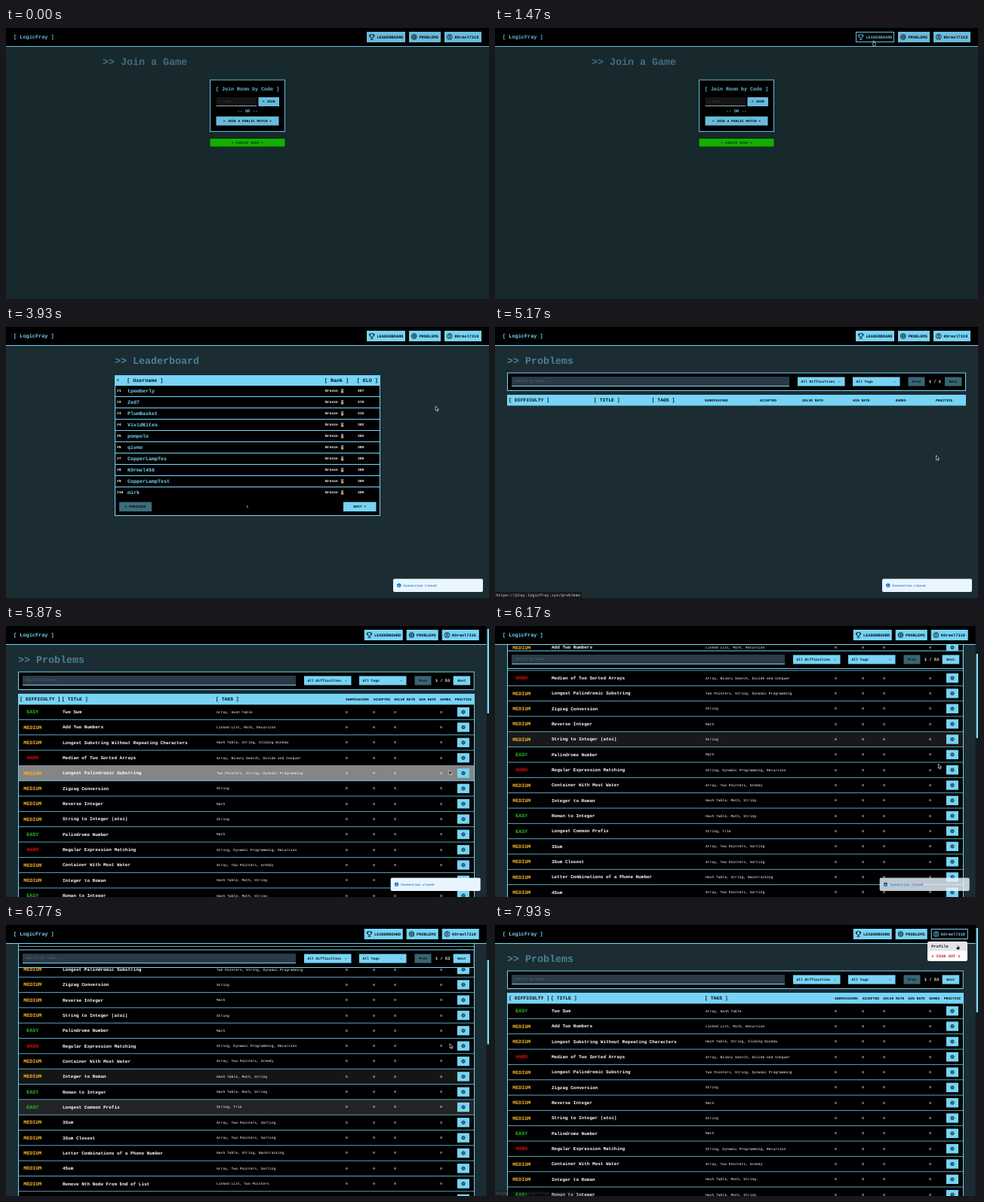
Recreate the animation shown at these times as an HTML page. Size 640 by 360 pixels, loop 8000 ms.

```html
<!DOCTYPE html>
<html lang="en">
<head>
<meta charset="utf-8">
<title>Coding match site walkthrough</title>
<style>
html, body { margin: 0; width: 100%; height: 100%; overflow: hidden; background: #1b2c33; }
svg {
  display: block; width: 640px; height: 360px;
  --c: #77d4f6; --bg: #1b2c33; --title: #4a7f96;
  font-family: "Liberation Mono", "Courier New", monospace;
  text-rendering: geometricPrecision;
}
svg.dim { --c: #69bbdb; --bg: #18292d; --title: #436d82; }
text { white-space: pre; }
.ink { fill: #050d10; }
.line { fill: none; stroke: #050d10; stroke-width: .8; }
.hover .face { fill: #000; }
.hover .ink { fill: var(--c); }
.hover .line { stroke: var(--c); }
</style>
</head>
<body>
<svg id="stage" viewBox="0 0 640 360"></svg>
<script>
const LOOP = 8000, C = 'var(--c)', INK = '#050d10', PITCH = 20.33;
const stage = document.getElementById('stage');

// Drawing helpers: boxes by corners, text by vertical centre
const box = (x, y, x2, y2, fill, more = '') =>
  `<rect x="${x}" y="${y}" width="${x2 - x}" height="${y2 - y}" fill="${fill}" ${more}/>`;
const frame = (x, y, x2, y2) =>
  box(x + .5, y + .5, x2 - .5, y2 - .5, '#000', `stroke="${C}"`);
const safe = s => s.replace(/&/g, '&amp;').replace(/</g, '&lt;');
const text = (x, y, size, s, fill = '#fff', weight = 700, more = '') =>
  `<text x="${x}" y="${(y + size * .32).toFixed(2)}" font-size="${size}" font-weight="${weight}" fill="${fill}" ${more}>${safe(s)}</text>`;
const mid = (x, y, size, s, fill, weight) => text(x, y, size, s, fill, weight, 'text-anchor="middle"');
const button = (x, y, x2, y2, s, fill = C, ink = INK) =>
  box(x, y, x2, y2, fill) + mid((x + x2) / 2, (y + y2) / 2, 4.67, s, ink);
const group = (id, body) => `<g id="${id}">${body}</g>`;
const heading = (x, s) => text(x, 44.5, 13.33, '>> ' + s, 'var(--title)');

function navButton(id, x, x2, label, icon) {
  return group(id,
    `<rect class="face" x="${x + .5}" y="5.5" width="${x2 - x - 1}" height="13" fill="${C}" stroke="${C}"/>` +
    `<g class="line" transform="translate(${x + 6.8} 12)">${icon}</g>` +
    `<text class="ink" x="${x + 13.4}" y="13.8" font-size="5.33" font-weight="700">${label}</text>`);
}

const trophy = '<path d="M-2-3.3H2V-.5A2 2 0 0 1-2-.5ZM-2-2.5H-3.4Q-3.4 0-1.7 .3M2-2.5H3.4Q3.4 0 1.7 .3M0 1.5V3.2M-2 3.3H2"/>';
const target = '<circle r="3.4"/><circle r="2"/><circle r=".6"/>';
const person = '<circle r="3.4"/><circle cy="-.9" r="1.2"/><path d="M-2.2 2.5Q0-.2 2.2 2.5"/>';

const header =
  box(0, 0, 640, 24, '#000') + box(0, 24, 640, 25, C) +
  text(10, 12, 6.9, '[ LogicFray ]', C) +
  group('nav',
    navButton('navBoard', 478, 529, 'LEADERBOARD', trophy) +
    navButton('navProblems', 534, 576, 'PROBLEMS', target) +
    navButton('navUser', 581, 630, 'KOrmel7318', person));

const join =
  heading(128, 'Join a Game') +
  frame(270, 68.5, 370, 138) +
  mid(320, 80.5, 6.67, '[ Join Room by Code ]', C) +
  box(278.5, 92, 332, 104, '#151515') + box(278.5, 103, 332, 104, '#8fa9b3') +
  text(282, 97.7, 4.67, '> Code', '#3a3a3a', 400) +
  button(334.5, 92, 362, 104, '< JOIN') +
  mid(320, 110.5, 5.6, '-- OR --', C) +
  button(278.5, 117.5, 361.5, 129.5, '> JOIN A PUBLIC MATCH <') +
  box(270, 146, 370, 158, '#062c04') +
  button(270.5, 147, 369.5, 157.5, '+ CREATE ROOM +', '#12b000', '#07480a');

const players = [
  ['tpemberly', 407], ['Zed7', 378], ['PlumBasket', 315], ['VividKites', 302], ['pompolo', 302],
  ['qivmo', 300], ['CopperLampTes', 300], ['KOrmel456', 300], ['CopperLampTest', 300], ['mirk', 300]
];
const playerRow = ([name, elo], i) => {
  const y = 85 + 15 * i;
  return (i ? box(144, y - 8, 496, y - 7, C) : '') +
    text(147, y, 4.67, '#' + (i + 1)) + text(161, y - .3, 6.67, name, C) +
    text(423, y, 4.67, 'Bronze') +
    `<path d="M443.6 ${y - 3}h4l-1 3h-2z" fill="#3f86b8"/><circle cx="445.6" cy="${y + 1}" r="1.9" fill="#d98945"/>` +
    text(466, y, 4.67, String(elo));
};
const boardFoot =
  button(150, 232.5, 193, 245, '< PREVIOUS', '#3d6c7d') +
  mid(320, 238.5, 4.67, '1', C) + button(447, 232.5, 490.5, 245, 'NEXT >');
const boardTop = box(144, 64, 496, 78, C) + text(147, 71, 4.67, '#', INK) +
  [[160.3, '[ Username ]'], [422, '[ Rank ]'], [464.8, '[ ELO ]']]
    .map(([x, s]) => text(x, 70.7, 6.67, s, INK)).join('');
const board = heading(144, 'Leaderboard') +
  group('boardEmpty', frame(144, 64, 496, 101) + `<g transform="translate(0 -150)">${boardFoot}</g>`) +
  group('boardFull', frame(144, 64, 496, 251) + players.map(playerRow).join('') + boardFoot) +
  boardTop;

// Filter bar: dx moves the selects, dr the right edge
function filterBar(dx, dr, pages, nextFill) {
  const select = (x, s) => box(x, 66.5, x + 62.5, 78.5, C) + text(x + 4.4, 72.5, 4.67, s, INK) +
    `<path d="M${x + 54} 71.8l1.5 1.5 1.5-1.5" fill="none" stroke="#2f6d85" stroke-width=".7"/>`;
  return frame(16, 60.5, 624 + dr, 85) +
    box(22, 66, 390 + dx, 79, '#2a3a47') + box(22, 78, 390 + dx, 79, C) +
    text(26, 72, 4.67, 'Search by name...', '#53697a', 400) +
    select(401 + dx, 'All Difficulties') + select(474 + dx, 'All Tags') +
    button(547.5 + dx, 66.5, 569.5 + dx, 78.5, 'Prev', '#3a6475') +
    text(575 + dx, 72.5, 5.33, pages) +
    button(596 + dr, 66.5, 618.5 + dr, 78.5, 'Next', nextFill);
}
const columns = (right, big, small) => box(16, 90, right, 104.5, C) +
  ['[ DIFFICULTY ]', '[ TITLE ]', '[ TAGS ]'].map((s, i) => text(big[i], 97.2, 6.4, s, INK)).join('') +
  ['SUBMISSIONS', 'ACCEPTED', 'SOLVE RATE', 'WIN RATE', 'GAMES', 'PRACTICE']
    .map((s, i) => text(small[i], 97.2, 4.67, s, INK)).join('');

const problems = `E|Two Sum|Array, Hash Table
M|Add Two Numbers|Linked List, Math, Recursion
M|Longest Substring Without Repeating Characters|Hash Table, String, Sliding Window
H|Median of Two Sorted Arrays|Array, Binary Search, Divide and Conquer
M|Longest Palindromic Substring|Two Pointers, String, Dynamic Programming
M|Zigzag Conversion|String
M|Reverse Integer|Math
M|String to Integer (atoi)|String
E|Palindrome Number|Math
H|Regular Expression Matching|String, Dynamic Programming, Recursion
M|Container With Most Water|Array, Two Pointers, Greedy
M|Integer to Roman|Hash Table, Math, String
E|Roman to Integer|Hash Table, Math, String
E|Longest Common Prefix|String, Trie
M|3Sum|Array, Two Pointers, Sorting
M|3Sum Closest|Array, Two Pointers, Sorting
M|Letter Combinations of a Phone Number|Hash Table, String, Backtracking
M|4Sum|Array, Two Pointers, Sorting
M|Remove Nth Node From End of List|Linked List, Two Pointers
E|Valid Parentheses|String, Stack
E|Merge Two Sorted Lists|Linked List, Recursion
M|Generate Parentheses|String, Dynamic Programming, Backtracking
H|Merge k Sorted Lists|Linked List, Divide and Conquer
M|Swap Nodes in Pairs|Linked List, Recursion
H|Reverse Nodes in k-Group|Linked List, Recursion`.split('\n').map(l => l.split('|'));
const levels = { E: ['EASY', '#1fc41f'], M: ['MEDIUM', '#f8b62c'], H: ['HARD', '#dc0c0c'] };

function problemRow([level, name, tags], i) {
  const top = 104.1 + PITCH * i, y = top + 10.1, [label, color] = levels[level];
  return box(16, top, 621, top + PITCH, '#858585', `class="shade" opacity="0"`) +
    mid(35.2, y, 6.67, label, color) + text(75, y, 6, name) + text(279, y, 4.67, tags, '#fff', 400) +
    [451.3, 487.7, 515.6, 576.7].map(x => mid(x, y, 4.67, '0', '#fff', 400)).join('') +
    box(598, y - 6.2, 614, y + 6.2, C) +
    `<circle cx="606" cy="${y}" r="2.2" fill="#3a7488" stroke="#1d4452"/>` +
    box(16, top + PITCH - .5, 621, top + PITCH + .4, C, 'opacity=".85"');
}
const tableEnd = 104 + PITCH * problems.length;
const loaded =
  group('scroller', heading(16, 'Problems') +
    box(16, 104, 621, tableEnd, '#000') + problems.map(problemRow).join('') +
    box(16, 90, 17, tableEnd, C) + box(620, 90, 621, tableEnd, C) +
    columns(621, [18.3, 74, 278], [450, 486.7, 514.3, 547.5, 575.3, 594.8])) +
  group('sticky', filterBar(-6, -3.3, '1 / 53', C));
const loading = heading(16, 'Problems') + filterBar(0, 0, '1 / 1', '#3a6475') +
  columns(624, [18.3, 131, 207.7], [277.8, 350.8, 407, 474.3, 530.7, 584]);

const toast = box(513, 334.5, 632, 352, '#e9f5fe', 'rx="2"') +
  '<circle cx="520.8" cy="343.3" r="2.7" fill="#1c74d4"/>' + mid(520.8, 343.3, 4, 'i') +
  text(526.5, 343.3, 4.33, 'Connection closed', '#2f88d8');
const menu = box(573, 22, 626, 48, '#fff', 'rx="2.5"') + box(573, 23.5, 626, 34.5, '#e3e4ea') +
  text(578.3, 28, 5.33, 'Profile', '#15181c') + text(578.3, 41.3, 5.33, 'x SIGN OUT x', '#d0202a');
const url = '<rect id="urlBox" y="352" height="8" fill="#15191b"/>' +
  text(1.3, 356, 5.33, '', '#dcdcdc', 400, 'id="urlText"');
const arrow = '<path d="M0 0V6.2L1.5 4.9 2.4 7 3.4 6.6 2.5 4.6H4.4Z" fill="#111" stroke="#fff" stroke-width=".6"/>';
const hand = '<path d="M-.5 0H.5V2.4L2.8 3V5L2 6.8H-.8L-2 4.4-1.5 3.6-.5 4.2Z" fill="#111" stroke="#fff" stroke-width=".5"/>';

stage.innerHTML = box(0, 0, 640, 360, 'var(--bg)') +
  group('join', join) + group('board', board) + group('loading', loading) + group('loaded', loaded) + header +
  group('bar', box(636.7, 0, 640, 360, '#12191d') + `<rect id="thumb" x="637.6" width="2.4" height="112" fill="${C}"/>`) +
  group('toast', toast) + group('url', url) + group('menu', menu) +
  group('cursor', group('arrow', arrow) + group('hand', hand));

const el = {};
stage.querySelectorAll('[id]').forEach(n => el[n.id] = n);
const shades = [...stage.querySelectorAll('.shade')];

// Motion tables: time, then values
const path = [
  [200, 281, 142], [370, 281, 142], [530, 375, 175], [700, 375, 175], [800, 464, 190], [1230, 464, 190],
  [1500, 503, 11], [1980, 503, 11], [2400, 515.5, 245], [2600, 521, 243], [3030, 521, 243], [3270, 524, 229],
  [3430, 524, 229], [4230, 590, 48], [4370, 590, 48], [4700, 556, 11], [4930, 556, 11], [5150, 584.5, 170.5],
  [5350, 584.5, 170.5], [5700, 587, 191.5], [5900, 587, 191.5], [6170, 587.3, 183], [6770, 588, 157.5],
  [7130, 588, 157.5], [7420, 601, 12], [7650, 601, 12], [7900, 613, 26]
];
const scroll = [[5880, 0], [6170, 106], [6400, 218], [6600, 218], [6770, 136.5], [7050, 0]];
// Row, start, end, strength
const touches = [[4, 5600, 5900, 1], [7, 5930, 6070, .38], [10, 6180, 6260, .4], [13, 6400, 6626, 1],
  [11, 6560, 6634, .5], [2, 7070, 7200, 1]];

const clamp = v => Math.max(0, Math.min(1, v));
const within = (t, a, b) => t >= a && t < b;
const show = (node, on) => { node.style.display = on ? '' : 'none'; };

function sample(keys, t) {
  const n = keys.findIndex(k => k[0] > t);
  if (n === 0) return keys[0].slice(1);
  if (n < 0) return keys[keys.length - 1].slice(1);
  const a = keys[n - 1], b = keys[n];
  const p = (t - a[0]) / (b[0] - a[0]), e = p * p * (3 - 2 * p);
  return a.slice(1).map((v, i) => v + (b[i + 1] - v) * e);
}

function setUrl(page, alpha) {
  const s = 'https://play.logicfray.xyz/' + page;
  if (el.urlText.textContent !== s) el.urlText.textContent = s;
  el.urlBox.setAttribute('width', s.length * 3.2 + 3);
  el.url.setAttribute('opacity', alpha);
}

function render(t) {
  const ready = t >= 5550, shift = ready ? -3.3 : 0;
  stage.classList.toggle('dim', t < 1830);
  show(el.join, t < 1830);
  show(el.board, within(t, 1830, 4970));
  show(el.boardEmpty, t < 2150);
  show(el.boardFull, t >= 2150);
  show(el.loading, within(t, 4970, 5550));
  show(el.loaded, ready);
  show(el.bar, ready);
  el.nav.setAttribute('transform', `translate(${shift} 0)`);

  const over = { navBoard: within(t, 1450, 2050), navProblems: within(t, 4650, 4980), navUser: t >= 7390 };
  for (const id in over) el[id].classList.toggle('hover', over[id]);

  const [s] = sample(scroll, t);
  el.scroller.setAttribute('transform', `translate(0 ${-s})`);
  el.sticky.setAttribute('transform', `translate(0 ${-Math.min(s, 28)})`);
  el.thumb.setAttribute('y', 4 + s * .311);
  shades.forEach(n => n.setAttribute('opacity', 0));
  for (const [row, a, b, k] of touches)
    shades[row].setAttribute('opacity', k * clamp((t - a) / 120) * clamp(1 - (t - b) / 200));

  const rise = clamp((t - 2150) / 200);
  el.toast.setAttribute('opacity', rise * clamp(1 - (t - 6120) / 280));
  el.toast.setAttribute('transform', `translate(${shift} ${(1 - rise) * 12})`);

  if (t < 4000) setUrl('leaderboard', within(t, 2030, 2640) ? 1 : 0);
  else if (t < 7000) setUrl('problems', within(t, 5000, 5600) ? 1 : 0);
  else setUrl('profile', .3 * clamp((t - 7840) / 80));
  show(el.menu, t >= 7600);

  const [x, y] = sample(path, t);
  const pointing = Object.values(over).some(Boolean);
  show(el.cursor, t >= 200);
  show(el.hand, pointing);
  show(el.arrow, !pointing);
  el.cursor.setAttribute('transform', `translate(${x} ${y})`);
}

const start = performance.now();
function tick() {
  render((performance.now() - start) % LOOP);
  requestAnimationFrame(tick);
}
tick();
</script>
</body>
</html>
```
